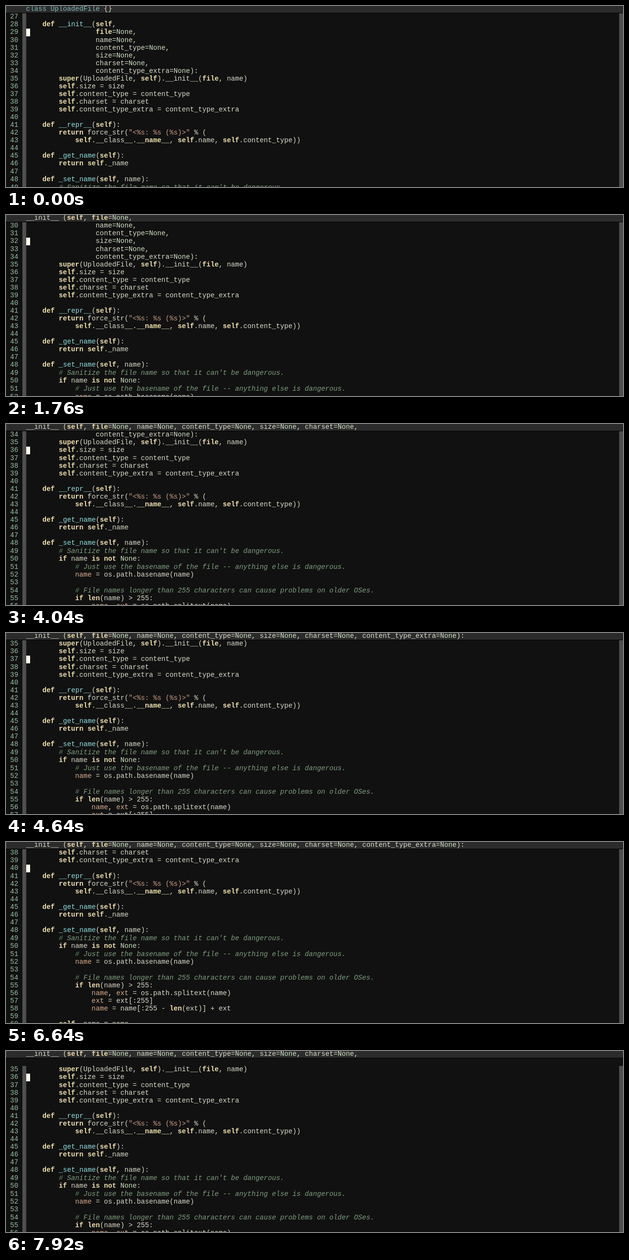
An HTML page that plays this animation: 1280x376 px, repeating every 8 s.

```html
<!DOCTYPE html>
<html lang="en">
<head>
<meta charset="utf-8">
<title>Code scrolling</title>
<style>
  html, body { margin: 0; width: 100%; height: 100%; overflow: hidden; background: #111; }
  #stage { position: relative; width: 1280px; height: 376px; overflow: hidden; background: #111; }
  /* 15px type on a 9 x 17 grid, shown at 1280 / 1355 */
  .scaled {
    position: absolute; left: 0; top: 0; width: 1355px;
    transform: scale(.94465); transform-origin: 0 0;
    font: 15px/17px "Liberation Mono", monospace; color: #dcdccc;
    white-space: pre; font-variant-ligatures: none;
  }
  #view { position: absolute; left: 0; top: 15px; width: 1280px; height: 361px; overflow: hidden; }
  #view .scaled { top: -.4px; }
  .line { position: relative; height: 17px; }
  .line.tall { padding-top: 1px; }
  .num { position: absolute; left: 9px; color: #98c0a2; }
  .code { position: absolute; left: 44px; }
  .fringe { position: absolute; top: 0; width: 8px; height: 361px; background: #4f4f4f; }
  #cursor { position: absolute; left: 42px; top: 32px; width: 8px; height: 16px; background: #ffffef; }
  #blank { position: absolute; left: 0; top: 0; width: 1280px; height: 16px; background: #111; }
  #head { position: absolute; left: 0; top: 0; width: 1280px; height: 15px; overflow: hidden; background: #2b2b2b; }
  #head::after { content: ""; position: absolute; left: 0; top: 14px; width: 1280px; height: 1px; background: #000; }
  #head::before { content: ""; position: absolute; left: 0; top: 0; width: 1px; height: 14px; background: #4a5c5c; }
  #title { position: absolute; left: 44px; top: -1px; }
  .key { color: #f0dfaf; font-weight: bold; }
  .fn { color: #93e0e3; }
  .str { color: #c89c84; }
  .const { color: #cfe3c3; }
  .var { color: #d9ae8f; }
  .hash { color: #5f7f5f; font-style: italic; }
  .note { color: #7f9f7f; font-style: italic; }
  .type { color: #7cb8bb; }
</style>
</head>
<body>
<div id="stage">
  <div id="view">
    <div class="fringe" style="left:34px"></div>
    <div class="fringe" style="left:1272px"></div>
    <div class="scaled"><div id="lines" style="position:relative"></div></div>
    <div id="cursor"></div>
    <div id="blank"></div>
  </div>
  <div id="head"><div class="scaled"><div id="title"></div></div></div>
</div>
<script>
const FIRST = 27, ROW = 17, LOOP = 8000;

const source = `
    def __init__(self,
                 file=None,
                 name=None,
                 content_type=None,
                 size=None,
                 charset=None,
                 content_type_extra=None):
        super(UploadedFile, self).__init__(file, name)
        self.size = size
        self.content_type = content_type
        self.charset = charset
        self.content_type_extra = content_type_extra

    def __repr__(self):
        return force_str("<%s: %s (%s)>" % (
            self.__class__.__name__, self.name, self.content_type))

    def _get_name(self):
        return self._name

    def _set_name(self, name):
        # Sanitize the file name so that it can't be dangerous.
        if name is not None:
            # Just use the basename of the file -- anything else is dangerous.
            name = os.path.basename(name)

            # File names longer than 255 characters can cause problems on older OSes.
            if len(name) > 255:
                name, ext = os.path.splitext(name)
                ext = ext[:255]
                name = name[:255 - len(ext)] + ext

        self._name = name`.split("\n");

const params = ["self,", "file=None,", "name=None,", "content_type=None,",
  "size=None,", "charset=None,", "content_type_extra=None):"];

const token = new RegExp([
  "(?<hash># )(?<note>.*)",
  "(?<str>\"[^\"]*\")",
  "(?<fn>(?<=def )\\w+)",
  "(?<type>class \\w+)",
  "(?<key>\\b(?:def|return|if|is|not|super|self|file|len|__name__)\\b)",
  "(?<const>\\bNone\\b)",
  "(?<var>\\b(?:name|ext)(?= = |, ext = ))"
].join("|"), "g");

function add(parent, cls, text, tag = "span") {
  const el = document.createElement(tag);
  el.className = cls;
  el.textContent = text;
  parent.append(el);
  return el;
}

function paint(parent, text) {
  let at = 0;
  parent.textContent = "";
  for (const m of text.matchAll(token)) {
    parent.append(text.slice(at, m.index));
    for (const [cls, part] of Object.entries(m.groups)) if (part) add(parent, cls, part);
    at = m.index + m[0].length;
  }
  parent.append(text.slice(at));
}

const $ = id => document.getElementById(id);
const lines = $("lines"), title = $("title"), blank = $("blank");

source.forEach((text, i) => {
  const row = add(lines, text.includes("# ") ? "line tall" : "line", "", "div");
  add(row, "num", FIRST + i);
  paint(add(row, "code", ""), text);
});

// time, top line, parameters in the header, first row still empty
const steps = [
  [0, 27, 0], [80, 28, 0], [840, 29, 0], [880, 29, 1], [1760, 30, 2],
  [2320, 31, 3], [2880, 32, 4], [3480, 33, 5], [4040, 34, 6], [4640, 35, 7],
  [5800, 36, 7], [6280, 37, 7], [6640, 38, 7], [7000, 37, 7, true], [7040, 37, 7],
  [7320, 36, 7], [7600, 35, 7], [7920, 34, 6, true]
];

let shown;
function show(time) {
  const step = steps.findLast(s => s[0] <= time);
  if (step === shown) return;
  shown = step;
  const [, top, count, empty] = step;
  lines.style.top = (FIRST - top) * ROW + "px";
  blank.style.display = empty ? "block" : "none";
  paint(title, count ? "__init__ (" + params.slice(0, count).join(" ") : "class UploadedFile {}");
}

const start = performance.now();
function tick() {
  show((performance.now() - start) % LOOP);
  requestAnimationFrame(tick);
}
tick();
</script>
</body>
</html>
```
